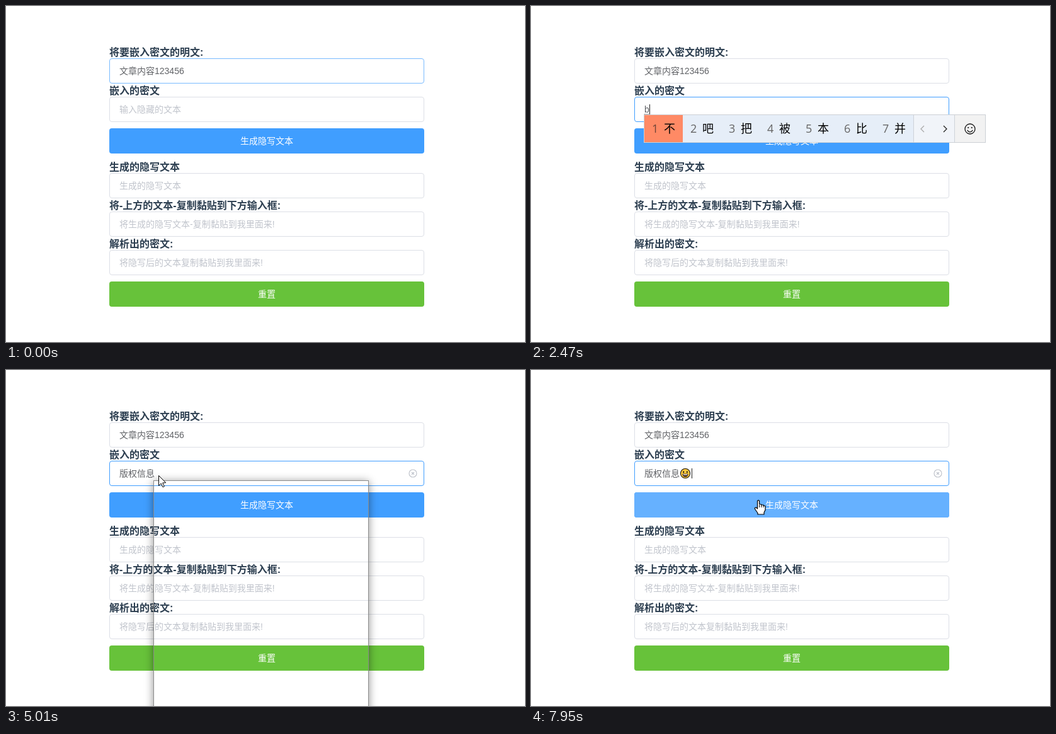
Write an HTML page with a canvas that moves like this. It is 824x533 px and loops after 8 s.

```html
<!DOCTYPE html>
<html lang="zh-CN">
<head>
<meta charset="utf-8">
<title>隐写文本</title>
<style>
html, body { margin: 0; width: 100%; height: 100%; overflow: hidden; background: #fff; }
canvas { display: block; }
</style>
</head>
<body>
<canvas id="stage" width="824" height="533"></canvas>
<script>
const ctx = document.getElementById('stage').getContext('2d');
const LOOP = 8000, TAU = Math.PI * 2;
const CJK = '"Noto Sans CJK SC", "Noto Sans CJK", "Noto Sans CJK JP", sans-serif';
const FORM = '"Liberation Sans", ' + CJK;
const BODY = '14px ' + FORM;
const BLUE = '#409eff', GRAY = '#c0c4cc', INK = '#606266';

// Key times
const FOCUS2 = 1800, TYPE = 2470, COMMIT = 4070, OPEN = 5010, FILLED = 5140,
  HOVER = 5870, PICK = 6400, CLOSE = 7480;

// Pointer way points: time, x, y
const PATH = [
  [70, 769, 515], [400, 405, 178], [600, 338, 125], [870, 290, 98], [930, 290, 98],
  [1140, 243, 100], [1200, 243, 100], [1400, 220, 159], [1600, 211, 160], [1800, 211, 160],
  [2190, 242, 167], [5670, 242, 167], [5940, 280, 288], [6250, 264, 297], [6600, 264, 297],
  [7260, 130, 201], [7480, 130, 201], [7950, 361, 207]
];
const PRESSES = [[880, 1150], [1790, 1930], [6300, 6450], [7290, 7470]];

const LABELS = [
  ['将要嵌入密文的明文:', 73], ['嵌入的密文', 134], ['生成的隐写文本', 255],
  ['将-上方的文本-复制黏贴到下方输入框:', 316], ['解析出的密文:', 377]
];
const INPUTS = [
  [83, ''], [144, '输入隐藏的文本'], [265, '生成的隐写文本'],
  [326, '将生成的隐写文本-复制黏贴到我里面来!'], [387, '将隐写后的文本复制黏贴到我里面来!']
];

// Composition steps: time, letters, candidates
const STEPS = [
  [2470, 'b', '不 吧 把 被 本 比 并'],
  [2530, 'ba', '吧 把 八 爸 罢 霸 巴'],
  [2730, 'ban', '版 办 班 半 般 搬 板'],
  [2930, "ban'q", '版权 半圈 班前 办钱 半球 半期 版'],
  [3010, "ban'qu", '版权 半区 半曲 办去 半圈 班去 版'],
  [3080, "ban'qua", '版权 半圈 办权 班权 半拳 半全 版'],
  [3220, "ban'quan", '版权 半圈 © 版 办 班 半'],
  [3410, "ban'quan'x", '版权性 版权 半圈 © 版 办 班'],
  [3480, "ban'quan'xi", '版权系 版权 半圈 © 版 办 班'],
  [3610, "ban'quan'xin", '版权新 版权 半圈 © 版 办 班'],
  [3680, "ban'quan'xin'x", '版权信息 版权 半圈 © 版 办 班'],
  [3810, "ban'quan'xin'xi", '版权信息 版权 半圈 © 版 办 班']
];

// Each face: eyes, mouth, extras
const FACES = ('.D ^E ^Dt >DT .D ^D ^Ds >D ;) ^)b ^p B) hD ;xk ^)K .x ' +
  '^x uxb ^)b .) ^Dc *D ._g ._ ._ -_ .0 r_ ~/ >( .(d .o ' +
  '.z .o uod >w >oc uoZ u) .P').split(' ');

function fill(color, x, y, w, h) {
  ctx.fillStyle = color;
  ctx.fillRect(x, y, w, h);
}

function write(str, x, mid, font, color, align = 'left') {
  const size = parseFloat(font.match(/([\d.]+)px/)[1]);
  ctx.font = font;
  ctx.fillStyle = color;
  ctx.textAlign = align;
  ctx.fillText(str, x, Math.round(mid + size * 0.36));
}

function line(color, width, ...pts) {
  ctx.beginPath();
  for (let i = 0; i < pts.length; i += 2) ctx.lineTo(pts[i], pts[i + 1]);
  ctx.strokeStyle = color;
  ctx.lineWidth = width;
  ctx.stroke();
}

function arc(x, y, r, from, to, color, width) {
  ctx.beginPath();
  ctx.arc(x, y, r, from * Math.PI, to * Math.PI);
  ctx.strokeStyle = color;
  ctx.lineWidth = width;
  ctx.stroke();
}

function oval(x, y, rx, ry, color) {
  ctx.beginPath();
  ctx.ellipse(x, y, rx, ry, 0, 0, TAU);
  ctx.fillStyle = color;
  ctx.fill();
}

const disc = (x, y, r, color) => oval(x, y, r, r, color);

function poly(pts, paint, edge, width = 1) {
  ctx.beginPath();
  for (let i = 0; i < pts.length; i += 2) ctx.lineTo(pts[i], pts[i + 1]);
  ctx.closePath();
  ctx.lineWidth = width;
  if (paint) { ctx.fillStyle = paint; ctx.fill(); }
  if (edge) { ctx.strokeStyle = edge; ctx.stroke(); }
}

function at(x, y, draw, scale = 1, turn = 0) {
  ctx.save();
  ctx.translate(x, y);
  ctx.rotate(turn);
  ctx.scale(scale, scale);
  draw();
  ctx.restore();
}

function heart(x, y, r, paint, edge) {
  ctx.beginPath();
  ctx.moveTo(x, y + r);
  ctx.bezierCurveTo(x - r * 2, y - r * 0.3, x - r * 0.8, y - r * 1.7, x, y - r * 0.4);
  ctx.bezierCurveTo(x + r * 0.8, y - r * 1.7, x + r * 2, y - r * 0.3, x, y + r);
  if (paint) { ctx.fillStyle = paint; ctx.fill(); }
  if (edge) { ctx.strokeStyle = edge; ctx.lineWidth = 1.2; ctx.stroke(); }
}

function pointer(t) {
  const i = PATH.findIndex(p => p[0] > t);
  if (i === 0) return { x: 900, y: 600 };
  if (i < 0) { const e = PATH[PATH.length - 1]; return { x: e[1], y: e[2] }; }
  const a = PATH[i - 1], b = PATH[i], k = (t - a[0]) / (b[0] - a[0]);
  return { x: a[1] + (b[1] - a[1]) * k, y: a[2] + (b[2] - a[2]) * k };
}

function over(t, top) {
  const p = pointer(t);
  if (t >= OPEN && t < CLOSE && p.x >= 235 && p.y >= 165) return false;
  return p.x > 164 && p.x < 664 && p.y > top && p.y < top + 40;
}

const blink = (t, start) => Math.floor((t - start) / 530) % 2 === 0;

function box(top, edge) {
  ctx.beginPath();
  ctx.roundRect(164.5, top + 0.5, 499, 39, 3.5);
  ctx.strokeStyle = edge;
  ctx.lineWidth = 1;
  ctx.stroke();
}

function button(t, top, str, color, light) {
  let glow = 0;
  for (let k = 0; k < 5; k++) glow += over(t - k * 20, top) / 5;
  ctx.beginPath();
  ctx.roundRect(164, top, 500, 40, 4);
  ctx.fillStyle = color;
  ctx.fill();
  ctx.globalAlpha = glow;
  ctx.fillStyle = light;
  ctx.fill();
  ctx.globalAlpha = 1;
  write(str, 414, top + 20, BODY, '#fff', 'center');
}

function clearIcon(y) {
  arc(646, y, 6, 0, 2, GRAY, 1.2);
  line(GRAY, 1.2, 644, y - 2, 648, y + 2);
  line(GRAY, 1.2, 648, y - 2, 644, y + 2);
}

function firstText(t) {
  const str = '文章内容123456';
  write(str, 180, 103, BODY, INK);
  if (t < 930 || t >= FOCUS2) return;
  const digit = 7.786, x = t < 1140 ? pointer(t).x : 243;
  const from = 236 + Math.min(6, Math.round((x - 236) / digit)) * digit;
  const width = 236 + 6 * digit - from;
  if (width <= 0) return;
  ctx.save();
  ctx.beginPath();
  ctx.rect(from, 84, width, 38);
  ctx.clip();
  fill('#338fff', from, 84, width, 38);
  write(str, 180, 103, BODY, '#fff');
  ctx.restore();
}

function secondText(t) {
  const caret = x => fill('#222', x, 156, 1, 16);
  if (t < TYPE) {
    if (t >= FOCUS2 && blink(t, FOCUS2)) caret(180);
  } else if (t < COMMIT) {
    const str = STEPS.filter(s => s[0] <= t).pop()[1];
    write(str, 180, 164, BODY, INK);
    const end = 180 + ctx.measureText(str).width;
    for (let x = 180; x < end; x += 2) fill('#555', x, 171, 1, 1);
    caret(Math.round(end));
  } else {
    write('版权信息', 180, 164, BODY, INK);
    if (t >= PICK) at(245, 164, () => face('.D'), 0.7);
    if (blink(t, t < PICK ? COMMIT : PICK)) caret(t < PICK ? 236 : 255);
  }
}

function form(t) {
  for (const [str, mid] of LABELS) write(str, 164, mid, 'bold 16px ' + FORM, '#2c3e50');
  const focus = t < FOCUS2 ? 0 : 1;
  INPUTS.forEach(([top, hint], i) => {
    const active = t < 70 ? '#79bbff' : BLUE;
    box(top, i === focus ? active : over(t, top) ? GRAY : '#dcdfe6');
    if (i !== 1 || t < TYPE) write(hint, 180, top + 20, BODY, GRAY);
  });
  firstText(t);
  secondText(t);
  if (t >= 70 && t < FOCUS2) clearIcon(103);
  if (t >= COMMIT) clearIcon(164);
  button(t, 194, '生成隐写文本', BLUE, '#66b1ff');
  button(t, 437, '重置', '#67c23a', '#85ce61');
}

function smiley(x, y, r, color) {
  arc(x, y, r, 0, 2, color, 1.3);
  disc(x - r * 0.35, y - r * 0.25, 1.1, color);
  disc(x + r * 0.35, y - r * 0.25, 1.1, color);
  arc(x, y + r * 0.05, r * 0.55, 0.1, 0.9, color, 1.2);
}

function candidates(t) {
  const words = STEPS.filter(s => s[0] <= t).pop()[2].split(' ');
  const cells = words.map(w => 43 + 18 * w.length);
  const end = 180 + cells.reduce((a, b) => a + b, 0);
  fill('#e6eef8', 179, 172, end - 179, 45);
  fill('#f1f4f9', end, 172, 65, 45);
  fill('#f2f2f2', end + 65, 172, 50, 45);
  let x = 180;
  words.forEach((word, i) => {
    if (!i) fill('#ff8a65', x, 173, cells[0], 43);
    write(String(i + 1), x + 12, 195, '18px "Open Sans", sans-serif', i ? '#666' : '#704438');
    write(word, x + 31, 195, '18px ' + CJK, '#000');
    x += cells[i];
  });
  fill('#cdd2d8', end, 173, 1, 43);
  fill('#cdd2d8', end + 65, 173, 1, 43);
  line('#aaa', 1.3, end + 17, 190, end + 12, 195, end + 17, 200);
  line('#222', 1.3, end + 48, 190, end + 53, 195, end + 48, 200);
  smiley(end + 90, 195, 8, '#111');
  ctx.strokeStyle = '#ccd0d5';
  ctx.lineWidth = 1;
  ctx.strokeRect(179.5, 172.5, end + 115 - 180, 44);
}

function eyes(kind) {
  for (const s of [-1, 1]) {
    const x = s * 4, y = -3;
    if (kind === '.' || (kind === ';' && s < 0)) oval(x, y, 1.5, 2, '#111');
    else if (kind === ';' || kind === '^') arc(x, y + 1, 2.2, 1.1, 1.9, '#111', 1.4);
    else if (kind === 'u') arc(x, y - 1, 2.2, 0.1, 0.9, '#111', 1.4);
    else if (kind === '-') line('#111', 1.4, x - 2.2, y, x + 2.2, y);
    else if (kind === '>') line('#111', 1.4, x + s * 2, y - 2, x - s * 2, y, x + s * 2, y + 2);
    else if (kind === 'B') {
      ctx.beginPath();
      ctx.roundRect(x - 5.5, y - 2.5, 11, 6, 2);
      ctx.fillStyle = '#111';
      ctx.fill();
    } else if (kind === 'h') heart(x * 1.3, y, 3.6, '#e8303f');
    else if (kind === '*') {
      const pts = [];
      for (let i = 0; i < 10; i++) {
        const r = i % 2 ? 1.9 : 4.2, a = i * Math.PI / 5 - Math.PI / 2;
        pts.push(x * 1.1 + r * Math.cos(a), y + r * Math.sin(a));
      }
      poly(pts, '#e8453c');
    } else if (kind === 'r') {
      disc(x, y, 3.4, '#fff');
      disc(x, y - 1.8, 1.5, '#111');
    } else if (kind === '~') {
      line('#111', 1.2, x - 2.5, y - 1.5, x + 2.5, y - 1.5);
      disc(x + 1, y, 1.5, '#111');
    }
  }
}

function bowl(r, paint) {
  ctx.beginPath();
  ctx.arc(0, 1.5, r, 0, Math.PI);
  ctx.closePath();
  ctx.fillStyle = paint;
  ctx.fill();
  ctx.strokeStyle = '#111';
  ctx.lineWidth = 1.2;
  ctx.stroke();
}

function mouth(kind) {
  if (kind === 'D') { bowl(5.8, '#3a1a14'); fill('#fff', -4.8, 2, 9.6, 2); }
  else if (kind === 'E') { bowl(6, '#fff'); line('#111', 0.8, -5, 4, 5, 4); }
  else if (kind === 'P') { bowl(5, '#3a1a14'); disc(0, 6, 2.8, '#e8303f'); }
  else if (kind === ')' || kind === 'p') {
    arc(0, 0.5, 5.5, 0.15, 0.85, '#111', 1.4);
    if (kind === 'p') disc(4, 6, 2.7, '#e8303f');
  } else if (kind === 'x') {
    arc(0, 2.8, 1.3, 1.5, 2.5, '#111', 1.3);
    arc(0, 5.4, 1.3, 1.5, 2.5, '#111', 1.3);
  } else if (kind === '_') line('#111', 1.4, -4, 4, 4, 4);
  else if (kind === '/') arc(0, 0, 5, 0.15, 0.55, '#111', 1.4);
  else if (kind === '(') arc(0, 8, 4, 1.15, 1.85, '#111', 1.4);
  else if (kind === 'o') oval(0, 5, 2.4, 2.9, '#3a1a14');
  else if (kind === 'w') {
    ctx.beginPath();
    ctx.arc(0, 7, 4.5, Math.PI, TAU);
    ctx.closePath();
    ctx.fillStyle = '#3a1a14';
    ctx.fill();
  } else if (kind === 'z') {
    fill('#555', -6, 3, 12, 3);
    for (let x = -5; x < 6; x += 2) fill('#ddd', x, 3, 1, 3);
  }
}

function drop(x, y) {
  disc(x, y, 2.5, '#3fb4e8');
  poly([x - 2, y - 1, x, y - 5, x + 2, y - 1], '#3fb4e8');
}

function extra(kind) {
  const hand = '#f59a38', red = '#e8303f', sleepy = 'px "Open Sans", sans-serif';
  if (kind === 't' || kind === 'T') { drop(-8.5, 3); drop(8.5, 3); }
  else if (kind === 's') drop(8, -6);
  else if (kind === 'd') drop(-7, 5);
  else if (kind === 'b') { disc(-7, 1.5, 2, '#f7923a'); disc(7, 1.5, 2, '#f7923a'); }
  else if (kind === 'k') heart(7, 6, 3.5, red);
  else if (kind === 'K') { heart(-8, 5, 3, red); heart(8, 6, 3.5, red); heart(7, -8, 3, red); }
  else if (kind === 'c') { disc(-7, 6, 2.8, hand); disc(7, 6, 2.8, hand); }
  else if (kind === 'g') { disc(-3, 9, 3, hand); line('#111', 1.2, -5, 7, 1, 6); }
  else if (kind === 'Z') {
    write('z', 1, -6, 'bold 11' + sleepy, '#26395c');
    write('z', 7, -9, 'bold 9' + sleepy, '#26395c');
  }
}

function face(code) {
  disc(0, 0, 11, '#ffc83d');
  arc(0, 0, 10.8, 0, 2, '#111', 1.5);
  eyes(code[0]);
  mouth(code[1]);
  if (code[2]) extra(code[2]);
}

const CATEGORIES = [
  () => { arc(0, 0, 8, 0, 2, '#111', 1.2); line('#111', 1.2, 0, -5, 0, 0, 4, 0); },
  () => {
    const c = '#ea5b16';
    arc(0, 0, 7.7, 0, 2, c, 1.3);
    disc(-3, -2.5, 1.1, c); disc(3, -2.5, 1.1, c);
    ctx.beginPath(); ctx.arc(0, 1, 4.5, 0, Math.PI); ctx.closePath(); ctx.stroke();
  },
  () => {
    arc(0, 1, 5, 0, 2, '#111', 1.1);
    line('#111', 1.2, -5, 8, -8, 7, -7, -3, -4, -7, 4, -7, 7, -3, 8, 7, 5, 8);
    line('#111', 1, -5, -1, 0, -4, 5, -1);
    disc(-2, 1, 0.8, '#111'); disc(2, 1, 0.8, '#111');
    arc(0, 2, 2, 0.1, 0.9, '#111', 1);
  },
  () => {
    ctx.beginPath(); ctx.ellipse(-1, -3, 4.5, 5.2, -0.3, 0, TAU);
    ctx.strokeStyle = '#111'; ctx.lineWidth = 1.2; ctx.stroke();
    line('#111', 1.1, 1, 2, 0, 4, 3, 5, 3, 7, 6, 8);
  },
  () => {
    poly([-5, -7, 6, -1, -4, 8], null, '#111', 1.2);
    line('#111', 1.2, -6, -8, 2, -7, 7, -2);
    arc(-1, -1, 1.5, 0, 2, '#111', 1); disc(-2, 3, 1, '#111');
  },
  () => {
    line('#111', 1.2, -5, 4, -8, 4, -8, 0, -5, -1, -3, -5, 4, -5, 6, -1, 8, 0, 8, 4, 6, 4);
    line('#111', 1.2, -5, -1, 6, -1); line('#111', 1.2, -2, 4, 3, 4);
    arc(-4, 4, 1.8, 0, 2, '#111', 1.2); arc(5, 4, 1.8, 0, 2, '#111', 1.2);
  },
  () => heart(0, 0, 7, null, '#111')
];

function omega() {
  arc(0, -1, 6, 0.68, 2.32, '#111', 1.2);
  for (const s of [-1, 1]) line('#111', 1.2, s * 3.3, 4, s * 2.4, 6.5, s * 7, 6.5);
}

function panel(t) {
  ctx.save();
  ctx.beginPath();
  ctx.rect(0, 0, 824, 533);
  ctx.rect(234, 175, 342, 400);
  ctx.clip('evenodd');
  ctx.shadowColor = 'rgba(0,0,0,.45)';
  ctx.shadowBlur = 13;
  ctx.shadowOffsetY = 2;
  fill('#000', 234, 175, 342, 400);
  ctx.restore();

  if (t >= FILLED) {
    fill('#fff', 235, 176, 340, 400);
    fill('#f2f2f2', 235, 176, 340, 96);
    write('表情符号', 251, 205, '15px ' + CJK, '#666');
    line('#555', 1, 554, 187, 564, 197);
    line('#555', 1, 564, 187, 554, 197);
    smiley(263, 244, 7.7, '#c97b5c');
    fill('#cf8263', 255, 262, 16, 2);
    write(';-)', 303, 244, '16px "Open Sans", sans-serif', '#111', 'center');
    at(343, 244, omega);

    if (t >= HOVER) fill('#f9bfa0', 243, 272, 40, 40);
    ctx.save();
    ctx.beginPath();
    ctx.rect(235, 272, 340, 192);
    ctx.clip();
    FACES.forEach((code, i) => at(262.5 + i % 8 * 40, 293.5 + Math.floor(i / 8) * 40,
      () => face(code), 1, code[2] === 'T' ? -0.6 : 0));
    ctx.restore();
    if (t >= 5670) fill('#777', 571, 288, 2, 18);

    CATEGORIES.forEach((icon, i) => at(263 + i * 40, 484, icon));
    fill('#e05a1c', 295, 502, 16, 2);
    fill('#f2f2f2', 235, 512, 340, 30);
    write('提示:按句点键，可在编辑文字时随时插入表情符号', 251, 538, '13.3px ' + CJK, '#111');
  }
  ctx.strokeStyle = '#8c8c8c';
  ctx.lineWidth = 1;
  ctx.strokeRect(234.5, 175.5, 341, 400);
}

const SHAPES = {
  arrow() { poly([0.5, 0.5, 0.5, 16.5, 4.2, 13, 7, 18.8, 9.4, 17.7, 6.7, 12, 11.7, 11.8], '#fff', '#000'); },
  beam() {
    line('#000', 1, 0.5, -7, 0.5, 8);
    for (const y of [-7.5, 7.5]) {
      line('#000', 1, -3, y, 0, y);
      line('#000', 1, 1, y, 4, y);
    }
  },
  hand() {
    ctx.lineJoin = 'round';
    poly([-1.5, 0.5, 0, -0.5, 1.5, 0.5, 1.5, 6, 4, 6, 5, 7, 7.5, 7, 8.5, 8, 10.5, 8.5, 11, 10,
      11, 15, 9, 19, 9, 22, -1, 22, -1, 20, -5.5, 13.5, -5.5, 11.5, -3.5, 11, -1.5, 13], '#fff', '#000', 1.2);
    for (const x of [1.5, 4.7, 7.9]) line('#000', 1, x, 7, x, 11);
  }
};

function cursor(t) {
  if (t < 70 || (t >= TYPE && t < 3220)) return;
  const p = pointer(t), x = Math.round(p.x), y = Math.round(p.y);
  if (PRESSES.some(([a, b]) => t >= a && t < b)) disc(x - 1, y - 1, 12, 'rgba(255,255,0,.5)');
  const shape = [194, 437].some(top => over(t, top)) ? 'hand'
    : INPUTS.some(([top]) => over(t, top)) ? 'beam' : 'arrow';
  at(x, y, SHAPES[shape]);
}

function draw(t) {
  fill('#fff', 0, 0, 824, 533);
  form(t);
  if (t >= TYPE && t < COMMIT) candidates(t);
  if (t >= OPEN && t < CLOSE) panel(t);
  cursor(t);
}

function tick() {
  draw(performance.now() % LOOP);
  requestAnimationFrame(tick);
}
tick();
</script>
</body>
</html>
```
